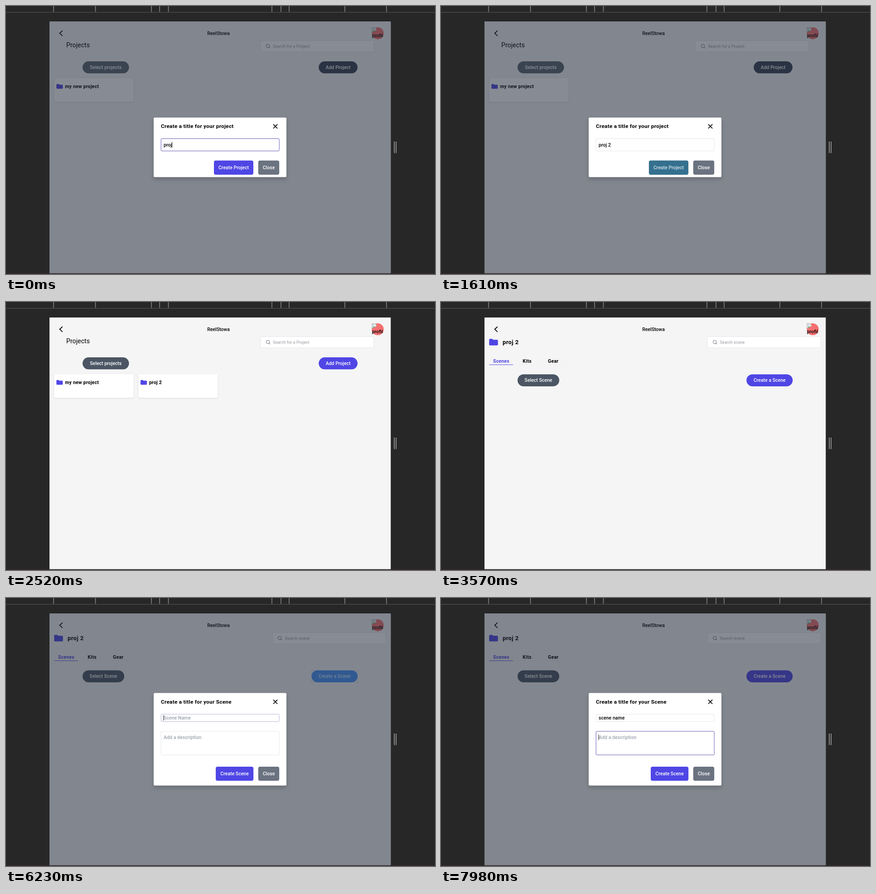
These frames come from a looping animation (947 by 591 pixels, 8 s). An HTML page:

```html
<!DOCTYPE html>
<html lang="en">
<head>
<meta charset="utf-8">
<title>Project planner</title>
<style>
  html, body { margin: 0; width: 100%; height: 100%; overflow: hidden; background: #272727; }
  svg { display: block; width: 100vw; height: 100vh; }
  text { font-family: Roboto, sans-serif; font-weight: 500; white-space: pre; }
  .plain text { font-family: "Liberation Sans", Arial, sans-serif; font-weight: 400; }
</style>
</head>
<body>
<svg id="stage" viewBox="0 0 947 591"></svg>
<script>
const LOOP = 8000, STEP = 70;
const INDIGO = '#4f46e5', SLATE = '#4b5563', GREY = '#9ca3af', LINE = '#e5e7eb';
const stage = document.getElementById('stage');

const rect = (x, y, w, h, fill, r = 0, extra = '') =>
  `<rect x="${x}" y="${y}" width="${w}" height="${h}" rx="${r}" fill="${fill}" ${extra}/>`;
const line = (d, color, width = 1) =>
  `<path d="${d}" fill="none" stroke="${color}" stroke-width="${width}"/>`;
const text = (x, y, s, { size = 10.5, fill = '#000', weight = 500, gap = 0, anchor = 'start', id = '' } = {}) =>
  `<text x="${x}" y="${y}" font-size="${size}" fill="${fill}" text-anchor="${anchor}"
    style="font-weight:${weight};letter-spacing:${gap}px" ${id && `id="${id}"`}>${s}</text>`;

const ramp = (t, from, to) => Math.min(1, Math.max(0, (t - from) / (to - from)));
function mix(a, b, k) {
  const part = (c, i) => parseInt(c.slice(i, i + 2), 16);
  return `rgb(${[1, 3, 5].map(i => Math.round(part(a, i) + (part(b, i) - part(a, i)) * k))})`;
}

function button(x, y, w, h, r, fill, label, color = '#fff', extra = '') {
  return rect(x, y, w, h, fill, r, extra) +
    text(x + w / 2, y + h / 2 + 3.6, label, { fill: color, anchor: 'middle' });
}
const pill = (x, y, w, fill, label, color) => button(x, y, w, 26.4, 13.2, fill, label, color);

function folder(x, y, k) {
  return `<path transform="translate(${x} ${y}) scale(${k})" fill="${INDIGO}"
    d="M2 0H7L9 2.2H18Q20 2.2 20 4V13Q20 15 18 15H2Q0 15 0 13V2Q0 0 2 0Z"/>`;
}

function search(x, label) {
  return rect(x, 76.3, 250, 24.6, '#fff', 2, `stroke="${LINE}"`) +
    `<circle cx="${x + 15.9}" cy="88.1" r="3.7" fill="none" stroke="#6b7280"/>` +
    line(`M${x + 18.6} 90.8L${x + 20.8} 93`, '#6b7280', 1.1) +
    text(x + 27.3, 92, label, { size: 9.2, fill: '#96999f', weight: 400 });
}

function avatar(alt) {
  let s = '<circle cx="820.6" cy="60.1" r="13.2" fill="#f87171"/>';
  if (alt) s += `<path d="M808 47.5H814.5L818 51V53L813 56L808 58.5Z" fill="#e8ece8" stroke="#9a9d9f" stroke-width=".8"/>
    <path d="M809 57L812 53.5L814.5 55.5Z" fill="#55a060"/><circle cx="811" cy="50.5" r="1.2" fill="#9bb8e8"/>
    <g clip-path="url(#photo)">${text(807.8, 69.3, 'profile')}</g>`;
  return s;
}

function card(x, label, fill = '#fff') {
  return rect(x, 159, 175.5, 52.3, fill, 2, 'filter="url(#soft)"') + folder(x + 5, 172, .7) +
    text(x + 24, 180.7, label, { weight: 700, gap: .2 });
}

function projectsPage(t) {
  const reloaded = t >= 1820, plain = t >= 1820 && t < 1890, listed = !reloaded || t >= 2100;
  const select = reloaded ? mix(GREY, SLATE, ramp(t, 2030, 2310)) : '#5a6670';
  const w = plain ? 100 : 102.5;
  let s = text(133, 91.3, 'Projects', { size: 14.2, weight: 400 }) +
    search(562, 'Search for a Project') +
    pill(169, 122.1, w, select, 'Select projects') +
    pill(plain ? 691 : 690.3, 122.1, plain ? 85 : 85.7, reloaded ? INDIGO : '#374151', 'Add Project');
  if (listed) s += card(106.3, 'my new project');
  if (reloaded && listed) s += card(292, 'proj 2', t >= 3220 ? '#eef0f4' : '#fff');
  if (reloaded && t < 2520)
    s += rect(847, 34.5, 2.2, 541.5, '#8d8d8d', 1, `opacity="${1 - ramp(t, 2240, 2520)}"`);
  return s;
}

function scenesPage(t) {
  const held = t >= 5390 ? 1 - ramp(t, 6160, 6510) : 0;
  let s = folder(106.3, 81.2, .97) +
    text(136, 93.2, 'proj 2', { size: 13.1, weight: 700, gap: .33 }) +
    search(588.3, 'Search scene') +
    text(115, 133.6, 'Scenes', { weight: 700, gap: .2, fill: INDIGO }) +
    text(180.3, 133.6, 'Kits', { weight: 700, gap: .35 }) +
    text(236, 133.6, 'Gear', { weight: 700, gap: .28 }) +
    line('M106.5 138.3H159', INDIGO) + line('M170 138.3H214M225 138.3H271', '#ededee') +
    pill(169, 159.5, 92, SLATE, 'Select Scene') +
    pill(674.3, 159.5, 102, mix(INDIGO, '#45a5ff', held), 'Create a Scene', mix('#ffffff', '#c8e2ff', held));
  if (held) s += `<g opacity="${held}">` +
    line('M674.5 165V160H681M770 160H777.5V166M777.5 180V186H770M681 186H674.5V181', '#9fc8f0', .8) + '</g>';
  return s;
}

function header(t) {
  const alt = t < 1820 || (t >= 1960 && t < 3290) || t >= 3500;
  return line('M124.7 54.3L118.6 60.1L124.7 65.9', '#000', 1.8) +
    text(469, 63.8, 'ReelStowa', { anchor: 'middle' }) + avatar(alt);
}

function field(y, h, focus, value, hint) {
  return rect(342.2, y, 261, h, '#fff', 2, `stroke="${mix(LINE, '#625bb5', focus)}"`) +
    text(348, y + (h > 40 ? 17 : h / 2 + 3.6), value || hint, { fill: value ? '#000' : GREY, gap: .05, id: value ? 'typed' : '' });
}

function modal(y, h, title) {
  return rect(326, y, 293, h, '#fff', 2.5, 'filter="url(#deep)"') +
    text(342, y + 23.3, title, { size: 11.8, weight: 700, gap: .27 }) +
    line(`M590 ${y + 14.8}l9.2 9.2m0 -9.2l-9.2 9.2`, '#000', 1.7);
}

function projectModal(t) {
  const value = t < 140 ? 'proj' : t < 630 ? 'proj ' : 'proj 2';
  const press = ramp(t, 1470, 1610);
  return modal(246, 131.2, 'Create a title for your project') +
    field(292.5, 27.2, 1 - press, value, '') +
    button(459, 340.8, 87, 31.2, 4, mix(INDIGO, '#35708f', press), 'Create Project',
      mix('#ffffff', '#cfe2ec', press), press ? 'filter="url(#soft)"' : '') +
    button(556.8, 340.8, 46.4, 31.2, 4, '#6b7280', 'Close');
}

function typedName(t) {
  if (t < 6580) return '';
  if (t < 6720) return 's';
  if (t < 6930) return 'sc';
  return t >= 7350 ? 'scene name' : 'scene name'.slice(0, 3 + Math.floor((t - 6930) / STEP));
}

function sceneModal(t) {
  const leave = ramp(t, 7840, 7980);
  return modal(209.5, 204, 'Create a title for your Scene') +
    field(256.2, 16.4, ramp(t, 6160, 6370) * (1 - leave), typedName(t), 'Scene Name') +
    field(294, 52, leave, '', 'Add a description') +
    button(463, 371.9, 83.2, 31.2, 4, INDIGO, 'Create Scene') +
    button(556.8, 371.9, 46.4, 31.2, 4, '#6b7280', 'Close');
}

function caret(t) {
  if (t < 1260) return [299.8, 12.4];
  if (t >= 6230 && t < 7910) return [258.4, 12];
  return t >= 7910 ? [301.3, 12] : null;
}

const defs = `<defs>
  <filter id="soft" x="-10%" y="-20%" width="120%" height="150%"><feDropShadow dx="0" dy=".7" stdDeviation=".8" flood-opacity=".2"/></filter>
  <filter id="deep" x="-10%" y="-15%" width="120%" height="140%"><feDropShadow dx="0" dy="5" stdDeviation="5" flood-opacity=".2"/></filter>
  <clipPath id="photo"><rect x="807.4" y="47" width="25" height="26.5"/></clipPath>
</defs>`;

const ticks = [105, 197.5, 321, 339, 358.5, 587, 607, 625, 748, 840];
const frame = rect(0, 0, 947, 591, '#272727') + line('M0 14H947', '#4b4b4b', 1.3) +
  ticks.map(x => line(`M${x} 0V12.7`, '#858585', 1.6)).join('') +
  rect(0, 589.3, 947, 1.7, '#33292d') +
  line('M857.2 299V324.3M861.2 299V324.3', '#a3a3a3', 1.6) +
  rect(96, 34.2, 753.3, 555, '#f5f5f5');

let shown = -1;
function draw(t) {
  if (t === shown) return;
  shown = t;
  const first = t < 1820, last = t >= 5390;
  const plain = t >= 1820 && t < 1890;
  let s = defs + frame + `<g class="${plain ? 'plain' : ''}">` + header(t) +
    (t < 3290 ? projectsPage(t) : scenesPage(t)) + '</g>';
  if (first || last) s += rect(96, 34.2, 753.3, 555, '#1f2937', 0, 'opacity=".535"');
  if (first) s += projectModal(t);
  if (last) s += sceneModal(t);
  stage.innerHTML = s;

  const c = caret(t);
  if (!c) return;
  const typed = t < 7910 && document.getElementById('typed');
  const x = 348 + (typed ? typed.getComputedTextLength() + .3 : 0);
  stage.insertAdjacentHTML('beforeend', rect(x - .4, c[0], .9, c[1], '#000'));
}

const start = performance.now();
function tick(now) {
  const t = Math.max(0, now - start) % LOOP;
  draw(Math.floor(t / STEP) * STEP);
  requestAnimationFrame(tick);
}
draw(0);
requestAnimationFrame(tick);
</script>
</body>
</html>
```
